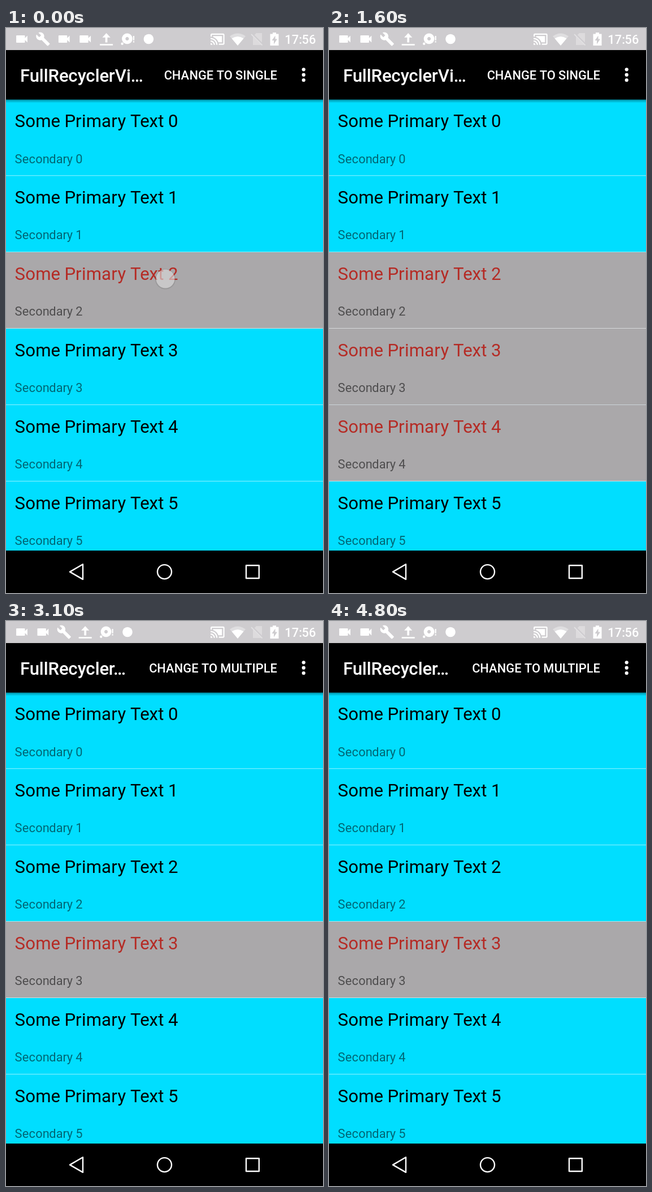
Animation, 561 px wide and 998 px high, one loop 5100 ms. Source, as an HTML page:

```html
<!DOCTYPE html>
<html lang="en">
<head>
<meta charset="utf-8">
<style>
  html, body { margin: 0; height: 100%; overflow: hidden; background: #000; }
  svg { display: block; width: 100%; height: 100%; font-family: Roboto, sans-serif; }
  .secondary { fill-opacity: .54; }
</style>
</head>
<body>
<svg viewBox="0 0 561 998">
  <defs>
    <linearGradient id="shade" x2="0" y2="1">
      <stop stop-opacity=".35"/><stop offset="1" stop-opacity="0"/>
    </linearGradient>
    <path id="cam" d="M17 10.500V7c0-.55-.45-1-1-1H4c-.55 0-1 .45-1 1v10c0 .55.45 1 1 1h12c.55 0 1-.45 1-1v-3.500l4 4v-11l-4 4z"/>
    <path id="wrench" d="M22.700 19l-9.100-9.100c.9-2.300.4-5-1.500-6.900-2-2-5-2.400-7.400-1.300L9 6 6 9 1.600 4.700C.4 7.100.9 10.100 2.900 12.100c1.900 1.900 4.600 2.400 6.900 1.500l9.100 9.100c.4.4 1 .4 1.400 0l2.300-2.300c.5-.4.5-1.100.1-1.400z"/>
    <path id="upload" d="M10.300 17.500V9.500H5.500L12 2.500l6.500 7h-4.800v8zM1.500 20h21v2.200h-21z"/>
    <g id="disc">
      <path fill-rule="evenodd" d="M11.500 3a8.500 8.500 0 1 0 .01 0zM11.500 8.700a2.800 2.800 0 1 1-.01 0z"/>
      <circle cx="3.500" cy="19.500" r="2"/>
      <path d="M21 7h2v7h-2zM21 15.500h2v2h-2z"/>
    </g>
    <circle id="dot" cx="12" cy="12" r="8"/>
    <path id="cast" d="M21 3H3c-1.100 0-2 .9-2 2v3h2V5h18v14h-7v2h7c1.100 0 2-.9 2-2V5c0-1.100-.9-2-2-2zM1 18v3h3c0-1.660-1.340-3-3-3zm0-4v2c2.760 0 5 2.240 5 5h2c0-3.870-3.130-7-7-7zm0-4v2c4.970 0 9 4.030 9 9h2c0-6.080-4.930-11-11-11zM19 7H5v1.630c3.960 1.280 7.090 4.410 8.370 8.370H19z"/>
  </defs>

  <!-- phone layout in its own 720 x 1280 pixels -->
  <g transform="scale(.77917 .77969)">
    <rect y="162" width="720" height="1022" fill="#00deff"/>
    <g id="list"></g>
    <rect y="162" width="720" height="8" fill="url(#shade)"/>
    <rect width="720" height="50" fill="#cecccf"/>
    <rect y="50" width="720" height="112"/>
    <rect y="1184" width="720" height="96"/>
    <g fill="#fff">
      <g id="title"></g>
      <g id="action"></g>
      <g id="clock"></g>
      <circle cx="676" cy="94" r="4"/><circle cx="676" cy="106" r="4"/><circle cx="676" cy="118" r="4"/>
    </g>
  </g>

  <g id="touch">
    <circle cx="282" cy="443.500" r="18" fill="#555" fill-opacity=".2"/>
    <circle cx="282" cy="443" r="16.500" fill="#eee" fill-opacity=".55"/>
  </g>

  <g id="status" fill="#fff"></g>
  <g fill="#fff">
    <use href="#cast" transform="translate(360.900 6.300) scale(1.120)"/>
    <path fill-opacity=".35" d="M396 14.500Q410 4.500 424 14.500L410 31z"/>
    <path d="M399.500 18.500Q410 11.500 420.500 18.500L410 31z"/>
    <path fill-opacity=".3" d="M443 9H453V30H437V15z"/>
    <path d="M434.500 10L454.500 30" stroke="#cecccf" stroke-width="4"/>
    <path d="M434 11L453.500 30.500" stroke="#fff" stroke-opacity=".4" stroke-width="2"/>
    <path d="M472 8h6v2.500h4.500V31h-15V10.500H472z"/>
    <path fill="#cecccf" d="M476.500 13.500L470.500 22H474V28.500L480 19.500H476.500z"/>
  </g>

  <g fill="none" stroke="#fff" stroke-width="2.400" stroke-linejoin="round">
    <path d="M113 960.600L136 947.300V973.900z"/>
    <circle cx="280.500" cy="960.600" r="12.500"/>
    <rect x="425" y="949.200" width="22.800" height="22.800"/>
  </g>
</svg>
<script>
const LOOP = 5100, ROW = 173;
const $ = id => document.getElementById(id);
const pen = document.createElement('canvas').getContext('2d');

// Like the phone: whole-pixel advances, kerning only inside words.
function line(text, x, y, size, weight, atEnd = false, cls = '') {
  pen.font = `${weight} ${size}px Roboto, sans-serif`;
  const width = s => pen.measureText(s).width;
  const xs = [];
  let pos = 0;
  [...text].forEach((ch, i, all) => {
    xs.push(pos);
    const next = all[i + 1] || ' ';
    const kern = ch === ' ' || next === ' ' ? 0 : width(ch + next) - width(ch) - width(next);
    pos += Math.round(width(ch)) + kern;
  });
  const left = atEnd ? x - pos : x;
  return `<text class="${cls}" x="${xs.map(v => left + v).join(' ')}" y="${y}"
    font-size="${size}" font-weight="${weight}">${text}</text>`;
}

// time, rows with red text, rows with grey background
const steps = [
  [0, [2], [2]],
  [400, [2, 3], [2]],
  [500, [2, 3], [2, 3]],
  [1000, [2, 3, 4], [2, 3]],
  [1100, [2, 3, 4], [2, 3, 4]],
  [1800, [], []],
  [2500, [2], [2]],
  [3100, [3], [3]],
  [3700, [4], [4]],
  [4100, [2], [4]],
  [4200, [2], [2]],
  [4800, [3], [3]]
];

for (let i = 0; i < 6; i++) {
  $('list').innerHTML += `<g transform="translate(0 ${162 + i * ROW})">
    <rect class="back" width="720" height="${ROW}" fill="#aaa8aa"/>
    <rect y="172" width="720" height="1" fill="#fff" fill-opacity=".75"/>
    ${line(`Some Primary Text ${i}`, 20, 63, 40, 400, false, 'primary')}
    ${line(`Secondary ${i}`, 20, 144, 28, 400, false, 'secondary')}</g>`;
}
const backs = document.querySelectorAll('.back');
const labels = document.querySelectorAll('.primary');

const iconRow = names => names.split(' ').map((name, i) =>
  `<use href="#${name}" transform="translate(${14.800 + i * 37.400} 6.300) scale(1.100)"/>`).join('');
$('status').innerHTML =
  `<g id="before">${iconRow('cam wrench cam cam upload disc dot')}</g>` +
  `<g id="after">${iconRow('cam cam wrench upload disc dot')}</g>`;
$('clock').innerHTML = line('17:56', 704, 36, 28, 500, true);

const show = (el, on) => el.setAttribute('visibility', on ? 'visible' : 'hidden');

function draw(now) {
  const t = now % LOOP;
  const [, red, grey] = steps.findLast(step => step[0] <= t);
  backs.forEach((el, i) => show(el, grey.includes(i)));
  labels.forEach((el, i) => el.setAttribute('fill', red.includes(i) ? '#b52b25' : '#000'));

  const single = t >= 1800;
  $('title').innerHTML = line(single ? 'FullRecycler…' : 'FullRecyclerVi…', 32, 122, 40, 500);
  $('action').innerHTML = line(single ? 'CHANGE TO MULTIPLE' : 'CHANGE TO SINGLE', 616, 117, 28, 500, true);

  show($('touch'), t < 100);
  show($('before'), t < 300);
  show($('after'), t >= 300);
  requestAnimationFrame(draw);
}
draw(0);
</script>
</body>
</html>
```
